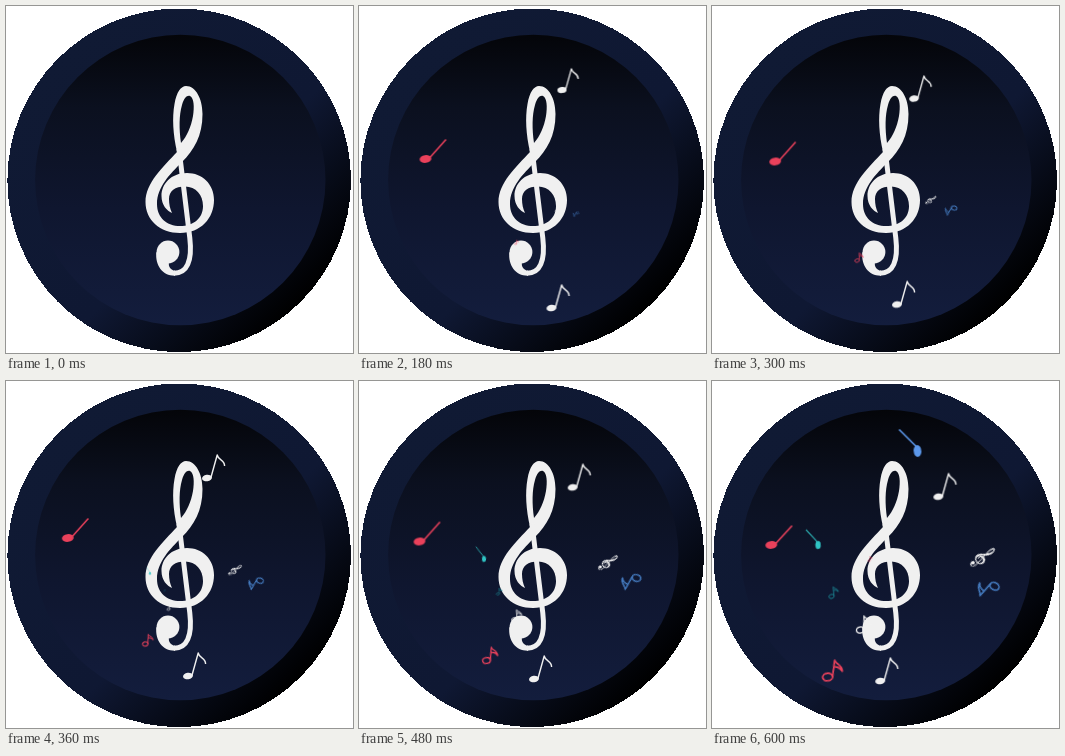
Write an HTML page that moves like this. It is 347 px wide and 347 px high and loops after 630 ms.

```html
<!DOCTYPE html>
<html lang="en">
<head>
<meta charset="utf-8">
<title>Music notes</title>
<style>
html, body { margin: 0; width: 100%; height: 100%; overflow: hidden; background: #fff; }
svg { display: block; width: 100vw; height: 100vh; }

/* 21 poses of 30 ms; steps() holds each pose */
.note { animation: 630ms -1ms infinite both; }
.red { color: #ea415b; }
.white { color: #f0f0f0; }
.blue { color: #5b97ea; }
.steel { color: #4379bd; }
.cyan { color: #2fc4c4; }
.teal { color: #1c8794; }

.n1 { animation-name: n1; }
.n2 { animation-name: n2; }
.n3 { animation-name: n3; }
.n4 { animation-name: n4; }
.n5 { animation-name: n5; }
.n6 { animation-name: n6; }
.n7 { animation-name: n7; }
.n8 { animation-name: n8; }
.n9 { animation-name: n9; }
.n10 { animation-name: n10; }
.n11 { animation-name: n11; }

@keyframes n1 {
  0% { transform: translate(72.5px, 150px) rotate(0deg) scale(0); animation-timing-function: step-end; }
  4.762% { transform: translate(72.5px, 150px) rotate(0deg) scale(1); animation-timing-function: steps(3); }
  19.048% { transform: translate(68.5px, 152px) rotate(0deg) scale(1); animation-timing-function: steps(4); }
  38.095% { transform: translate(64.5px, 154px) rotate(0deg) scale(1); animation-timing-function: steps(4); }
  57.143% { transform: translate(61.8px, 157px) rotate(0deg) scale(1); animation-timing-function: steps(4); }
  76.19% { transform: translate(60.5px, 160.5px) rotate(0deg) scale(1); animation-timing-function: steps(5); }
  100% { transform: translate(59px, 164.8px) rotate(1deg) scale(1); }
}
@keyframes n2 {
  0% { transform: translate(204px, 304.5px) scale(0); animation-timing-function: step-end; }
  4.762% { transform: translate(204px, 304.5px) scale(1); animation-timing-function: steps(3); }
  19.048% { transform: translate(197px, 302px) scale(1); animation-timing-function: steps(4); }
  38.095% { transform: translate(188px, 302px) scale(1); animation-timing-function: steps(4); }
  57.143% { transform: translate(182px, 295px) scale(1); animation-timing-function: steps(4); }
  76.19% { transform: translate(175px, 298px) scale(1); animation-timing-function: steps(5); }
  100% { transform: translate(166.5px, 300.5px) scale(1); }
}
@keyframes n3 {
  0%, 4.762% { transform: translate(189px, 125px) scale(0); animation-timing-function: steps(3); }
  19.048% { transform: translate(198px, 111px) scale(.7); animation-timing-function: steps(2); }
  28.571% { transform: translate(203px, 84px) scale(.92); animation-timing-function: steps(2); }
  38.095% { transform: translate(203px, 88px) scale(.95); animation-timing-function: steps(4); }
  57.143% { transform: translate(201px, 97px) scale(1); animation-timing-function: steps(9); }
  100% { transform: translate(229.5px, 118px) scale(1); }
}
@keyframes n4 {
  0%, 9.524% { transform: translate(178px, 214px) rotate(50deg) scale(0); animation-timing-function: steps(10); }
  57.143% { transform: translate(229px, 189px) rotate(50deg) scale(.085); animation-timing-function: steps(4); }
  76.19% { transform: translate(249px, 181.5px) rotate(50deg) scale(.122); animation-timing-function: steps(5); }
  100% { transform: translate(276px, 174.8px) rotate(50deg) scale(.162); }
}
@keyframes n5 {
  0%, 9.524% { transform: translate(195px, 212px) rotate(-150deg) scale(0); animation-timing-function: steps(10); }
  57.143% { transform: translate(249px, 202px) rotate(-145deg) scale(.68); animation-timing-function: steps(4); }
  76.19% { transform: translate(271px, 200px) rotate(-145deg) scale(.88); animation-timing-function: steps(2); }
  85.714% { transform: translate(277px, 205px) rotate(-142deg) scale(.95); animation-timing-function: steps(3); }
  100% { transform: translate(274px, 208px) rotate(-128deg) scale(.95); }
}
@keyframes n6 {
  0%, 9.524% { transform: translate(168px, 221px) rotate(0deg) scale(0); animation-timing-function: steps(19); }
  100% { transform: translate(118.5px, 294px) rotate(14deg) scale(1.05); }
}
@keyframes n7 {
  0%, 47.619% { transform: translate(153px, 199px) rotate(-70deg) scale(0); animation-timing-function: steps(2); }
  57.143% { transform: translate(144px, 192.5px) rotate(-76deg) scale(.25); animation-timing-function: steps(4); }
  76.19% { transform: translate(125px, 178px) rotate(-80deg) scale(.52); animation-timing-function: steps(5); }
  100% { transform: translate(101.3px, 160.5px) rotate(-86deg) scale(.73); }
}
@keyframes n8 {
  0%, 47.619% { transform: translate(168px, 209px) scale(0); animation-timing-function: steps(11); }
  100% { transform: translate(117px, 212px) scale(.58); }
}
@keyframes n9 {
  0%, 33.333% { transform: translate(171px, 215px) rotate(-6deg) scale(0); animation-timing-function: steps(14); }
  100% { transform: translate(150.5px, 246px) rotate(6deg) scale(.85); }
}
@keyframes n10 {
  0% { transform: translate(201.5px, 65px) rotate(-87deg) scale(0); animation-timing-function: step-end; }
  90.476% { transform: translate(201.5px, 65px) rotate(-87deg) scale(1); animation-timing-function: steps(2); }
  100% { transform: translate(209.5px, 75px) rotate(-87deg) scale(1); }
}
@keyframes n11 {
  0%, 85.714% { transform: translate(162px, 178px) scale(0); animation-timing-function: steps(3); }
  100% { transform: translate(156px, 178px) scale(.35); }
}
</style>
</head>
<body>
<svg viewBox="0 0 347 347">
  <defs>
    <linearGradient id="rim" gradientUnits="userSpaceOnUse" x1="52" y1="52" x2="295" y2="295">
      <stop offset="0" stop-color="#101a34"/>
      <stop offset=".6" stop-color="#0f1833"/>
      <stop offset=".96" stop-color="#010205"/>
      <stop offset="1" stop-color="#000"/>
    </linearGradient>
    <linearGradient id="face" x2="0" y2="1">
      <stop offset="0" stop-color="#040509"/>
      <stop offset=".25" stop-color="#0b101f"/>
      <stop offset=".6" stop-color="#0f162f"/>
      <stop offset="1" stop-color="#131d3d"/>
    </linearGradient>

    <g id="clef">
      <path fill="currentColor" fill-rule="evenodd" d="M171 146
        C167 128 166 112 168.5 98 C170.5 86 175 80 180 80
        C190 80 196.5 93 196.5 108 C196.5 130 188 144 176 156
        C164 168 151 181 151 198 C151 212 161 220 174 220
        C188 220 197 212 197 200 C197 189 190 180.5 179 180.5
        C169 180.5 163 185 163 193 C163 198 164 203 166 207
        C161 205 155.5 199 155.5 190 C155.5 178 165 167 181 167
        C196 167 208 178 208 194 C208 212 195 227 174 227
        C154 227 139.5 214 139.5 196 C139.5 177 157 161 171 146 Z
        M175 137 C173 123 173 109 176 99 C178 92 181 89 184 90
        C188 92 188.5 101 187 110 C185 121 181 130 175 137 Z"/>
      <path fill="none" stroke="currentColor" stroke-width="5"
        d="M173 143 L183.8 232 C186.5 255 181 267.2 168 267.2"/>
      <circle cx="162" cy="246" r="11.4" fill="currentColor"/>
      <path fill="currentColor" d="M150.3 246 C149 260 157 270 169 269.7 L169 264.6 C165 264.4 162 261 163 256 Z"/>
    </g>

    <g id="quarter">
      <ellipse rx="5.9" ry="3.9" transform="rotate(-8)" fill="currentColor"/>
      <path d="M4 -1 L20.5 -19.5" stroke="currentColor" stroke-width="1.5"/>
    </g>

    <g id="eighth">
      <ellipse rx="5" ry="3.3" transform="rotate(-8)" fill="currentColor"/>
      <path fill="none" stroke="currentColor" stroke-width="1.4" stroke-linejoin="round"
        d="M4 -.8 L10.2 -23 C11.5 -17 17.5 -19 17.6 -12"/>
    </g>

    <g id="hollow" fill="none" stroke="currentColor" stroke-width="1.7" stroke-linejoin="round">
      <ellipse cx="-4" cy="7" rx="5" ry="3.8" transform="rotate(-20 -4 7)"/>
      <path d="M.8 6 L-1 -11 C2 -7 8 -8 9 -2 C6 -5.5 2 -5 0 -4.5"/>
    </g>
  </defs>

  <circle cx="173.2" cy="174.3" r="171.8" fill="url(#rim)" shape-rendering="crispEdges"/>
  <circle cx="174.3" cy="174" r="145.2" fill="url(#face)"/>
  <use href="#clef" class="white"/>

  <g class="note white n9"><use href="#hollow"/></g>
  <g class="note teal n8"><use href="#hollow"/></g>
  <g class="note red n11"><use href="#hollow"/></g>
  <g class="note red n6"><use href="#hollow"/></g>
  <g class="note steel n5"><use href="#hollow"/></g>
  <g class="note white n4"><use href="#clef" x="-174" y="-175"/></g>
  <g class="note cyan n7"><use href="#quarter"/></g>
  <g class="note blue n10"><use href="#quarter"/></g>
  <g class="note red n1"><use href="#quarter"/></g>
  <g class="note white n2"><use href="#eighth"/></g>
  <g class="note white n3"><use href="#eighth"/></g>
</svg>
</body>
</html>
```
